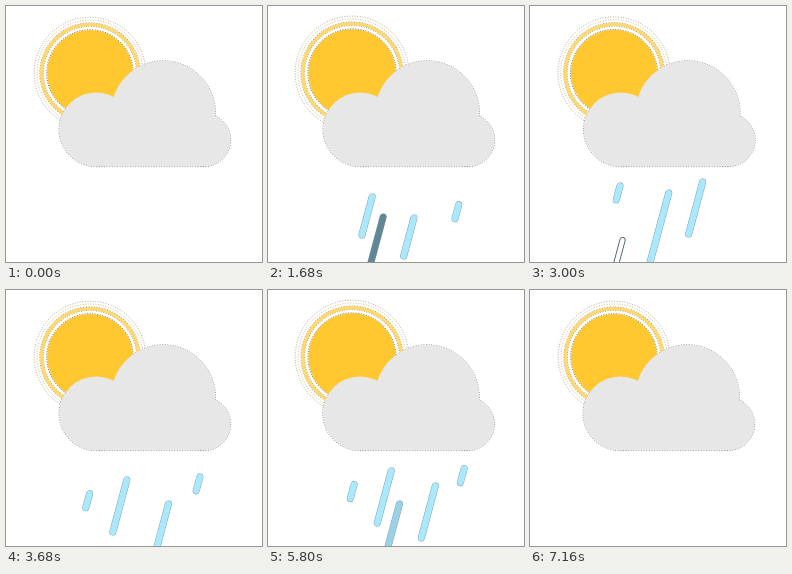
An HTML page with a canvas for the animation above (7200 ms loop, 256 by 256 pixels).

```html
<!DOCTYPE html>
<html lang="en">
<head>
<meta charset="utf-8">
<title>Sun, cloud and rain</title>
<style>
html, body { margin: 0; width: 100%; height: 100%; overflow: hidden; background: #fff; }
canvas { display: block; width: 256px; height: 256px; }
</style>
</head>
<body>
<canvas id="stage" width="256" height="256"></canvas>
<script>
const ctx = document.getElementById('stage').getContext('2d');
const LOOP = 7200, STEP = 40, SWAY = 3600, RAIN = 2400;
const FADE = 250, SLANT = 0.268;
const DOTS = [1, 1.6];

// line: x where the path meets y = 0; y, v, a: motion around time `at`
const drops = [
  { line: 138.2, len: 14, from: 320, to: 1580, at: 600, y: 180, v: 0.039, a: -0.000006, runs: 3 },
  { line: 155.3, len: 38, from: 1350, to: 3040, at: 1680, y: 191, v: 0.0037, a: 0.0000219, runs: 2 },
  { line: 171.7, len: 52, from: 700, to: 1825, at: 1000, y: 181, v: 0.0237, a: 0.00003, runs: 3 },
  { line: 188.8, len: 69, from: 200, to: 1225, at: 600, y: 187, v: 0.0555, a: 0.00003, runs: 3 },
  { line: 202.7, len: 38, from: 1320, to: 2700, at: 1680, y: 212, v: 0.0108, a: 0.000012, runs: 2 },
  { line: 219.8, len: 52, from: 330, to: 1600, at: 600, y: 176, v: 0.0416, a: 0.000021, runs: 3 },
  { line: 244, len: 14, from: 730, to: 1950, at: 1000, y: 178.6, v: 0.0295, a: 0, runs: 3 }
];

function ring(r, width, color, dash = []) {
  ctx.beginPath();
  ctx.arc(84, 67, r, 0, Math.PI * 2);
  ctx.setLineDash(dash);
  ctx.lineWidth = width;
  ctx.strokeStyle = color;
  ctx.stroke();
  ctx.setLineDash([]);
}

function drawSun(s) {
  const edge = 'rgba(70,50,0,0.6)';
  ring(55.8 * s, 0.7, edge, DOTS);
  ring(53 * s, 0.8, 'rgba(170,125,20,0.65)', DOTS);
  ring(48.4 * s, 4.4, edge, DOTS);
  ring(48.4 * s, 3.4, '#ffd870');
  ring(43.2 * s, 1, 'rgba(0,0,0,0.7)', DOTS);
  ctx.beginPath();
  ctx.arc(84, 67, 43 * s, 0, Math.PI * 2);
  ctx.fillStyle = '#ffc831';
  ctx.fill();
}

function cloudShape(dx) {
  const p = new Path2D();
  const disc = (x, y, r) => {
    p.moveTo(x + dx + r, y);
    p.arc(x + dx, y, r, 0, Math.PI * 2);
  };
  disc(90.2, 123.6, 37.1);
  disc(157.3, 107, 52.2);
  disc(198, 134, 26.6);
  p.rect(90 + dx, 118, 108, 42.6);
  return p;
}

function capsule(x, y, len, width, color, dash = []) {
  ctx.beginPath();
  ctx.moveTo(x, y);
  ctx.lineTo(x - SLANT * len, y + len);
  ctx.lineCap = 'round';
  ctx.lineWidth = width;
  ctx.strokeStyle = color;
  ctx.stroke();
  ctx.lineCap = 'butt';
}

function drawDrop(d, p) {
  if (p <= d.from || p >= d.to) return;
  const q = p - d.at;
  const y = d.y + d.v * q + d.a * q * q;
  const x = d.line - SLANT * y;
  const k = Math.min(1, (p - d.from) / FADE, (d.to - p) / FADE);
  if (k < 0.3) {
    capsule(x, y, d.len, 6.2, '#48606f');
    capsule(x, y, d.len, 4.4, '#fff');
  } else {
    const tone = [169, 233, 255].map(c => Math.round(c * k));
    capsule(x, y, d.len, 7, 'rgba(50,85,100,0.6)');
    capsule(x, y, d.len, 6.2, `rgb(${tone})`);
  }
}

function draw(t) {
  ctx.fillStyle = '#fff';
  ctx.fillRect(0, 0, 256, 256);
  const wave = (1 - Math.cos(t / SWAY * Math.PI * 2)) / 2;

  for (const d of drops)
    for (let i = 0; i < d.runs; i++) drawDrop(d, t - i * RAIN);

  const cloud = cloudShape(2 * wave);
  ctx.lineWidth = 1;
  ctx.strokeStyle = 'rgba(0,0,0,0.6)';
  ctx.setLineDash(DOTS);
  ctx.stroke(cloud);
  ctx.setLineDash([]);
  drawSun(1 + 0.02 * wave);
  ctx.fillStyle = '#e7e7e7';
  ctx.fill(cloud);
}

const start = performance.now();
function tick() {
  const t = (performance.now() - start) % LOOP;
  draw(Math.floor(t / STEP) * STEP);
  requestAnimationFrame(tick);
}
tick();
</script>
</body>
</html>
```
